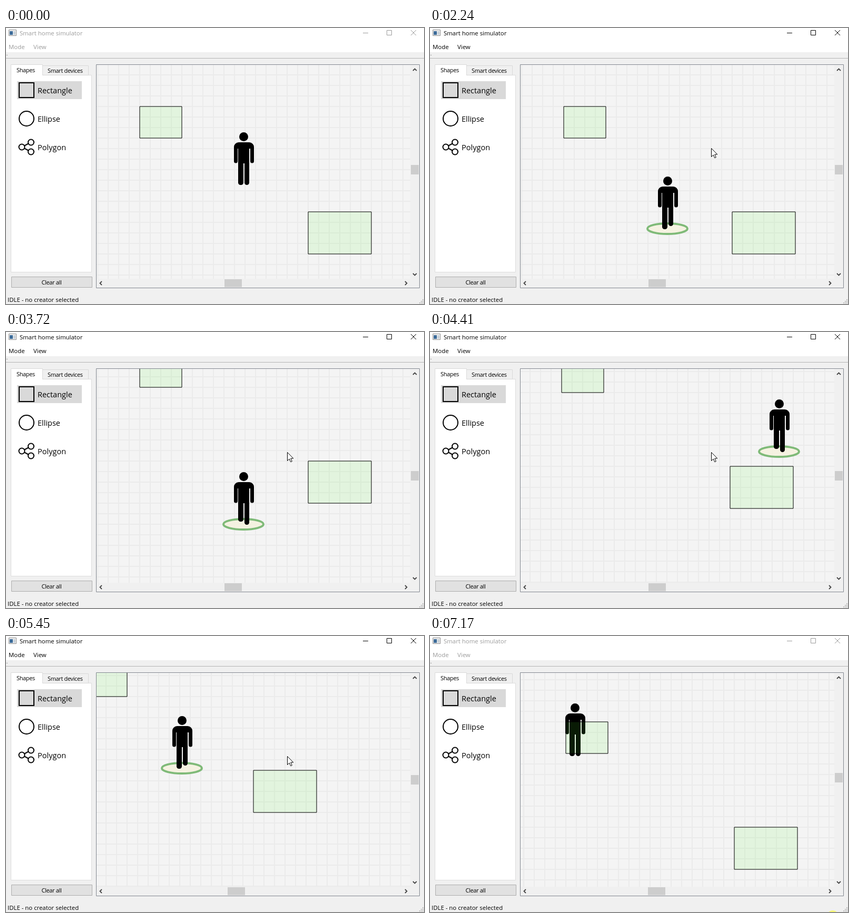
Recreate the animation shown at these times as an HTML page. Size 794 by 524 pixels, loop 7.22 s.

```html
<!DOCTYPE html>
<html lang="en">
<head>
<meta charset="utf-8">
<title>Smart home simulator</title>
<style>
  html, body { margin: 0; width: 100%; height: 100%; overflow: hidden; background: #f0f0f0; }
  svg { display: block; font: 11.4px "Open Sans", "Noto Sans", sans-serif; }
  .small { font-size: 11px; letter-spacing: -.35px; }
  .tool { font-size: 14.5px; }
  .line { fill: none; stroke: #000; stroke-width: 2; }
  .chrome { color: #000; }
  .chrome.inactive { color: #9b9b9b; }
  .chrome text { fill: currentColor; }
  .chrome path { fill: none; stroke: currentColor; }
</style>
</head>
<body>
<svg width="794" height="524" viewBox="0 0 794 524">
  <defs>
    <pattern id="grid" width="20" height="20" patternUnits="userSpaceOnUse" x="13" y="8">
      <path d="M0 1H20M1 0V20" stroke="#ebebeb" stroke-width="2"/>
    </pattern>
    <clipPath id="viewport"><path d="M172 70H768V476H172z"/></clipPath>
    <path id="chevron" d="M-3.5 2L0 -1.5L3.5 2" fill="none" stroke="#444" stroke-width="1.8"/>
  </defs>

  <!-- title bar and menu -->
  <path d="M0 0H794V46H0z" fill="#fff"/>
  <path d="M0 57.5H794" stroke="#b5b5b5"/>
  <path d="M1 51.5h2" stroke="#999"/>
  <path d="M5.5 3.5h14v11h-14z" fill="#f4f4f4" stroke="#8c8c8c"/>
  <path d="M7 6h6v7H7z" fill="#3b6a98"/>
  <path d="M14 6h4v7h-4z" fill="#c9d2da"/>
  <g class="chrome" id="chrome">
    <text x="26" y="14">Smart home simulator</text>
    <text x="5" y="40">Mode</text>
    <text x="52" y="40">View</text>
    <path d="M678 9.5h10M723.5 4.5h9v9h-9zM769 4l10 10M779 4l-10 10"/>
  </g>

  <!-- tool panel -->
  <path d="M9.5 89.5h153v374H9.5z" fill="#fff" stroke="#dcdcdc"/>
  <path d="M69.5 71.5h87v18h-87z" fill="#f0f0f0" stroke="#d9d9d9"/>
  <path d="M9.5 90V69.5h60V90" fill="#fff" stroke="#d9d9d9"/>
  <text class="small" x="20" y="84">Shapes</text>
  <text class="small" x="79" y="85">Smart devices</text>
  <path d="M21 101h123v34H21z" fill="#d9d9d9"/>
  <g class="line">
    <path d="M25 104h28v28H25z"/>
    <circle cx="39" cy="172" r="14"/>
    <path d="M35 223.5l7.5-4M35 228.5l7.5 4"/>
    <circle cx="47.500" cy="217" r="5.500"/>
    <circle cx="30" cy="226" r="5.500"/>
    <circle cx="47.500" cy="235" r="5.500"/>
  </g>
  <g class="tool">
    <text x="60" y="124">Rectangle</text>
    <text x="60" y="178">Ellipse</text>
    <text x="60" y="232">Polygon</text>
  </g>
  <path d="M10.5 472.5h153v20h-153z" fill="#e1e1e1" stroke="#adadad"/>
  <text class="small" x="67.500" y="487">Clear all</text>
  <text x="3" y="520">IDLE - no creator selected</text>

  <!-- scene -->
  <path d="M171.5 69.5h614v424h-614z" fill="#f0f0f0" stroke="#828790"/>
  <path d="M172 70H768V476H172z" fill="#f4f4f4"/>
  <g clip-path="url(#viewport)">
    <g id="scene">
      <path d="M-247 -252H1193V1008H-247z" fill="url(#grid)"/>
      <g id="person">
        <ellipse id="ring" cx="451" cy="297" rx="38" ry="10" fill="#f6f2de" fill-opacity=".85" stroke="#7fba78" stroke-width="4"/>
        <circle cx="451.500" cy="206.500" r="8.500"/>
        <path d="M433 253V226a9 9 0 0 1 9-9H462a9 9 0 0 1 9 9V253a3.5 3.5 0 0 1-7 0V229h-2V257H441V229h-1V253a3.5 3.5 0 0 1-7 0z"/>
        <rect id="leftLeg" x="441" y="250" width="10" height="48" rx="4.500"/>
        <rect id="rightLeg" x="453" y="250" width="9" height="48" rx="4.500"/>
      </g>
      <path d="M254 149h80v60h-80zM574 349h120v80h-120z" fill="rgba(80,240,50,.11)" stroke="#000"/>
    </g>
  </g>

  <!-- scroll bars and size grip -->
  <rect id="vThumb" x="769" width="15" height="18" fill="#cdcdcd"/>
  <rect id="hThumb" y="477" width="33" height="15" fill="#cdcdcd"/>
  <use href="#chevron" transform="translate(776.5 79)"/>
  <use href="#chevron" transform="translate(776.5 468) rotate(180)"/>
  <use href="#chevron" transform="translate(180 484.500) rotate(-90)"/>
  <use href="#chevron" transform="translate(760 484.500) rotate(90)"/>
  <path d="M791 516h2M788 519h2m1 0h2M785 522h2m1 0h2m1 0h2" stroke="#bcbcbc" stroke-width="2"/>

  <circle id="halo" r="12" fill="#ff0" fill-opacity=".5"/>
  <path id="cursor" d="M.5 .5V16.5l3.7-3.5 2.6 5.7 2.5-1.1-2.5-5.600h5z" fill="#fff" stroke="#000"/>
</svg>
<script>
const LOOP = 7220;
const SPEED = 0.44; // walking, px per ms
const STEP = 200;   // ms per footstep
const CLICK_IN = 1310, CLICK_OUT = 7150;

const $ = id => document.getElementById(id);
const clamp = (v, lo, hi) => Math.min(hi, Math.max(lo, v));
const between = (t, from, to) => t >= from && t < to;
const move = (id, x, y) => $(id).setAttribute('transform', `translate(${Math.round(x)} ${Math.round(y)})`);
const show = (id, on) => $(id).setAttribute('visibility', on ? 'visible' : 'hidden');

// Distance walked by time t while a key is held down.
const held = (t, from, to) => SPEED * (clamp(t, from, to) - from);

function walker(t) {
  const right = held(t, 3919, 4637);
  const left = held(t, 4704, 5832);
  const down = held(t, 2049, 2249) + held(t, 2708, 3476) + held(t, 4640, 4695);
  const up = held(t, 2249, 2708) + held(t, 3602, 4057) + held(t, 5700, 6000);
  return [right - left, down - up];
}

// The view scrolls only as far as needed to keep the walker inside its margins.
function scrollAt(t) {
  let sx = 0, sy = 0;
  const follow = ([x, y]) => {
    sx = clamp(sx, -176 - x, 212 - x);
    sy = clamp(sy, -70 - y, 120 - y);
  };
  for (let past = 0; past < t; past += 10) follow(walker(past));
  follow(walker(t));
  return [sx, sy];
}

function pointer(t) {
  let x = 671, y = 491;
  const glide = (from, to, toX, toY) => {
    const u = clamp((t - from) / (to - from), 0, 1);
    x += (toX - x) * u;
    y += (toY - y) * u;
  };
  glide(90, 400, 460, 228);     // onto the person
  glide(560, 740, 511, 234);    // off to the side
  glide(840, 930, 462, 233);    // back for the click
  glide(1490, 1670, 534, 228);  // rest
  glide(6760, 7170, 767, 533);  // out of the window
  return [x, y];
}

function draw(t) {
  const [x, y] = walker(t);
  const [sx, sy] = scrollAt(t);
  move('scene', sx, sy);
  move('person', x, y);
  $('hThumb').setAttribute('x', Math.round(414.7 - sx * .06));
  $('vThumb').setAttribute('y', Math.round(260.2 - sy * .038));

  const walking = between(t, 2049, 6000);
  const rightUp = Math.floor(t / STEP) % 2 === 1;
  move('leftLeg', 0, walking && !rightUp ? -6 : 0);
  move('rightLeg', 0, walking && rightUp ? -6 : 0);

  const active = between(t, CLICK_IN, CLICK_OUT);
  $('chrome').classList.toggle('inactive', !active);
  show('ring', between(t, 370, 640) || between(t, 890, CLICK_OUT));

  const [px, py] = pointer(t);
  move('cursor', px, py);
  move('halo', px - 2, py);
  show('cursor', t >= 90);
  show('halo', between(t, CLICK_IN, CLICK_IN + 40) || t >= CLICK_OUT);
}

const start = performance.now();
function tick() {
  draw((performance.now() - start) % LOOP);
  requestAnimationFrame(tick);
}
tick();
</script>
</body>
</html>
```
